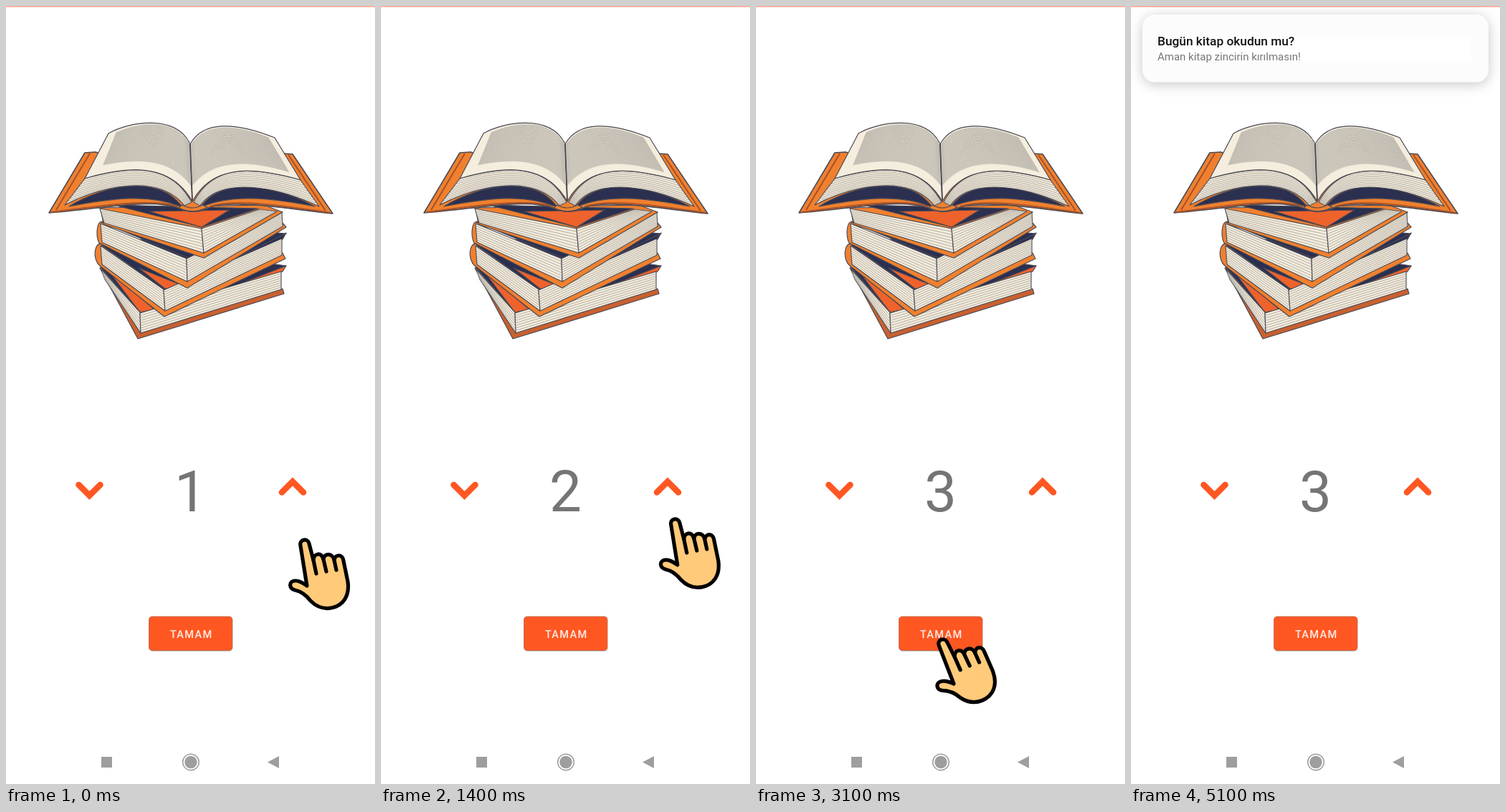
Animation, 515 px wide and 1087 px high, one loop 5.2 s. Source, as an HTML page:

```html
<!DOCTYPE html>
<html lang="tr">
<head>
<meta charset="utf-8">
<style>
  html, body { margin: 0; width: 100%; height: 100%; overflow: hidden; background: #fff; }
  svg { display: block; width: 100%; height: 100%; font-family: Roboto, sans-serif; }
  #books { stroke: #494a55; stroke-width: 1.2; stroke-linejoin: round; }
  #card rect:first-child { filter: drop-shadow(0 3px 9px rgba(0, 0, 0, .22)); }
</style>
</head>
<body>
<svg viewBox="0 0 515 1087">
  <rect width="515" height="1.5" fill="#ff9f88"/>
  <g id="books"></g>

  <g fill="none" stroke="#ff5722" stroke-width="8.6" stroke-linecap="round">
    <path d="M101.5 669 l15 15 l15 -15"/>
    <path d="M385 679.500 l15 -15 l15 15"/>
  </g>
  <text id="count" x="257.500" y="706" font-size="80" fill="#757575" text-anchor="middle">1</text>

  <rect x="200" y="855" width="116" height="47" rx="5" fill="#000" opacity=".18"/>
  <rect x="199.500" y="853" width="116.500" height="47.500" rx="4.500" fill="#ff5722" stroke="#b5674f" stroke-width=".8"/>
  <text x="229" y="882.500" font-size="14.600" font-weight="500" letter-spacing="1.3" fill="#ffebe4">TAMAM</text>

  <g fill="#9e9e9e">
    <rect x="133" y="1049" width="15" height="15"/>
    <circle cx="258" cy="1056.500" r="8.700"/>
    <circle cx="258" cy="1056.500" r="11.300" fill="none" stroke="#9e9e9e" stroke-width="1.5"/>
    <path d="M365 1056.500 L381 1048 V1065 Z"/>
  </g>

  <g id="hand">
    <g id="rays" transform="rotate(12)" stroke="#fff" stroke-width="5.5">
      <path d="M2 -34 L-1 -16 M18 -34 L13 -25 M-24 -28 L-9 -14 M-48 -9 L-24 -7 M-37 1 L-13 -7 M14 -5 L43 1 M11 -14 L25 -23"/>
    </g>
    <g fill="#ffca7a" stroke="#000" stroke-width="5.2" stroke-linecap="round" stroke-linejoin="round">
      <path d="M-6 7 C-8 -2 4 -4 6 4 L12 27 C13 17 23 16 26 26 C27 17 39 17 41 27 C43 18 53 19 54 28 L60 57 C63 78 53 91 37 94 C26 96 16 92 8 84 C2 76 -5 71 -14 69 C-23 66 -22 56 -13 56 C-7 56 -3 59 3 63 Z"/>
      <path fill="none" d="M12 27 L16 46 M26 26 L30 43 M41 27 L44 41"/>
    </g>
  </g>

  <g id="card">
    <rect x="16" y="12" width="483" height="94.500" rx="17" fill="#fcfcfc"/>
    <rect x="37" y="43" width="437" height="34" fill="#fff"/>
    <text x="37" y="55" font-size="17.300" font-weight="500" fill="#111">Bugün kitap okudun mu?</text>
    <text x="37" y="76" font-size="15" fill="#757575">Aman kitap zincirin kırılmasın!</text>
  </g>
</svg>

<script>
const $ = id => document.getElementById(id);
const ORANGE = '#f0802e', RED = '#ee622c', NAVY = '#2b2f50', PAPER = '#f5eddd', LINE = '#aaa59d';

const shapes = [];
const shape = (d, fill, extra = '') => shapes.push(`<path d="${d}" fill="${fill}" ${extra}/>`);
// A curve is [x1,y1,x2,y2] for a line or eight numbers for a cubic.
const tail = c => (c.length > 4 ? 'C' : 'L') + c.slice(2).join(' ');
const open = c => `M${c[0]} ${c[1]}${tail(c)}`;
const reversed = c => c.map((_, i) => c[c.length - 2 - (i & ~1) + (i & 1)]);
const mix = (a, b, k) => a.map((v, i) => +(v + (b[i] - v) * k).toFixed(1));

// Paper between two edges, ruled with lines that blend one edge into the other.
function paper(top, bottom, rows, fill = PAPER, width = .9, outline = '') {
  const back = reversed(bottom);
  shape(`${open(top)}L${back[0]} ${back[1]}${tail(back)}Z`, fill, outline);
  let d = '';
  for (let i = 1; i < rows; i++) d += open(mix(top, bottom, i / rows));
  shape(d, 'none', `stroke="${LINE}" stroke-width="${width}"`);
}

// Bottom book
shape('M131 366 L184 465 L388 402 L386 395 L188 456 L136 364 Z', '#c9602f');
shape('M132 365 L187 428 L222 432 L391 363 L300 350 Z', NAVY);
shape('M140 366 L187 428 L207 424 Z', RED);
shape('M225 428 L391 363 L386 371 L190 432 Z', RED);
paper([133, 368, 187, 428], [138, 382, 188, 457], 6);
paper([187, 429, 384, 371], [188, 457, 384, 396], 8);

// Third book
shape('M134 332 C122 330 121 355 131 363 L221 434 L390 353 L386 345 L222 424 Z', ORANGE);
shape('M133 334 L220 396 L256 394 L391 318 L300 310 Z', NAVY);
shape('M185 366 L222 395 L250 392 Z', RED);
shape('M252 392 L391 317 L386 326 L222 398 Z', RED);
shape('M340 343 L390 318 L386 325 L300 365 Z', NAVY);
paper([132, 335, 220, 396], [134, 361, 222, 426], 8);
paper([220, 397, 385, 325], [222, 426, 385, 348], 9);

// Second book
shape('M134 301 C125 302 126 324 130 331 L253 394 L391 309 L386 303 L252 382 Z', ORANGE);
shape('M133 302 L252 351 L276 351 L386 288 Z', NAVY);
paper([132, 304, 252, 353], [134, 330, 253, 385], 8);
paper([252, 353, 385, 288], [253, 385, 386, 308], 10);

// Top closed book
shape('M132 282 L136 305 L276 352 L386 288 L360 278 Z', ORANGE);
shape('M150 278 L273 309 L352 283 Z', NAVY);
shape('M200 287 L273 309 L312 285 Z', RED);
paper([131, 283, 273, 311], [137, 303, 276, 345], 8);
paper([273, 311, 354, 284], [276, 345, 378, 287], 9);

// Open book: cover, shadow, page blocks
shape('M60 289 L110 205 L125 204 L258 250 L386 206 L400 207 L456 290 C400 284 320 270 285 281 Q262 293 240 282 C200 268 130 284 60 289 Z', ORANGE, 'stroke-width="1.6"');
shape('M63 288 C130 280 200 268 240 280 M453 289 C400 281 320 268 285 280 M70 285 L117 206 M446 286 L394 208', 'none', 'stroke="#a5512a" stroke-width="2"');
shape('M88 280 C140 248 215 236 246 281 C200 262 150 268 88 280 Z', NAVY);
shape('M431 280 C375 250 300 238 272 281 C315 262 370 268 431 280 Z', NAVY);
paper([110, 241, 165, 225, 228, 216, 259, 274], [82, 278, 140, 248, 215, 236, 249, 279], 9);
paper([411, 243, 350, 226, 290, 218, 262, 274], [437, 280, 375, 251, 300, 238, 271, 279], 9);
shape('M246 278 Q260 286 274 278 L281 281 Q262 292 241 282 Z', ORANGE);

// Open pages with their grey printed areas
shape('M110 241 L143 178 C170 162 237 150 257 193 L260 273 C228 216 165 225 110 241 Z', PAPER);
shape('M411 243 L375 184 C320 162 275 160 257 193 L260 273 C290 218 350 226 411 243 Z', PAPER);
const noEdge = 'stroke="none"';
paper([154, 176, 185, 162, 236, 154, 256, 193], [135, 223, 178, 214, 230, 212, 258, 252], 26, '#ddd7ca', .8, noEdge);
paper([366, 183, 320, 164, 277, 162, 258, 193], [396, 233, 345, 217, 290, 212, 260, 252], 26, '#ddd7ca', .8, noEdge);
let grain = '';
for (let i = 0; i < 4; i++) {
  grain += `M${188 + i * 4} 167 Q${204 + i} ${222 - i * 14} ${222 - i * 4} 167`;
  grain += `M${286 + i * 5} ${207 - i * 3} Q${310 + i} ${150 + i * 12} ${334 - i * 4} ${209 - i * 3}`;
}
shape(grain, 'none', 'stroke="#c4bdb0" stroke-width="1"');
shape('M257 193 L260 273', 'none', 'stroke-width="1.8"');
$('books').innerHTML = shapes.join('');

const LOOP = 5200, BEAT = 500, STEP = 100;
const show = (id, on) => $(id).setAttribute('visibility', on ? 'visible' : 'hidden');

// 0 while pressing, 1 when fully pulled back
const pullBack = phase => (Math.max(0, Math.abs(phase - 250) - 50) / 200) ** 1.7;

function cardOffset(t) {
  if (t < 3500) return 5 - 135 * (1 - (t - 3300) / 200) ** 2;
  return 5 * Math.max(0, 1 - (t - 3500) / 300) ** 2;
}

function draw(now) {
  const t = Math.floor(now % LOOP / STEP) * STEP;
  const onArrow = t < 2000, onButton = t >= 2600 && t < 3200;
  const phase = (onArrow ? t : t + 100) % BEAT;
  const back = pullBack(phase);
  const [x, y, turn] = onArrow ? [408, 705, 0] : [260, 886, -12];

  $('count').textContent = t < 1300 ? 1 : t < 1800 ? 2 : 3;
  $('hand').setAttribute('transform', `translate(${x} ${y}) rotate(${turn}) translate(${9 * back} ${42 * back})`);
  show('hand', onArrow || onButton);
  $('rays').setAttribute('opacity', phase === 300 ? 1 : 0);
  show('card', t > 3300);
  $('card').setAttribute('transform', `translate(0 ${cardOffset(t)})`);
  requestAnimationFrame(draw);
}

const start = performance.now();
requestAnimationFrame(function frame(now) {
  draw = (paint => stamp => paint(Math.max(0, stamp - start)))(draw);
  draw(now);
});
</script>
</body>
</html>
```
